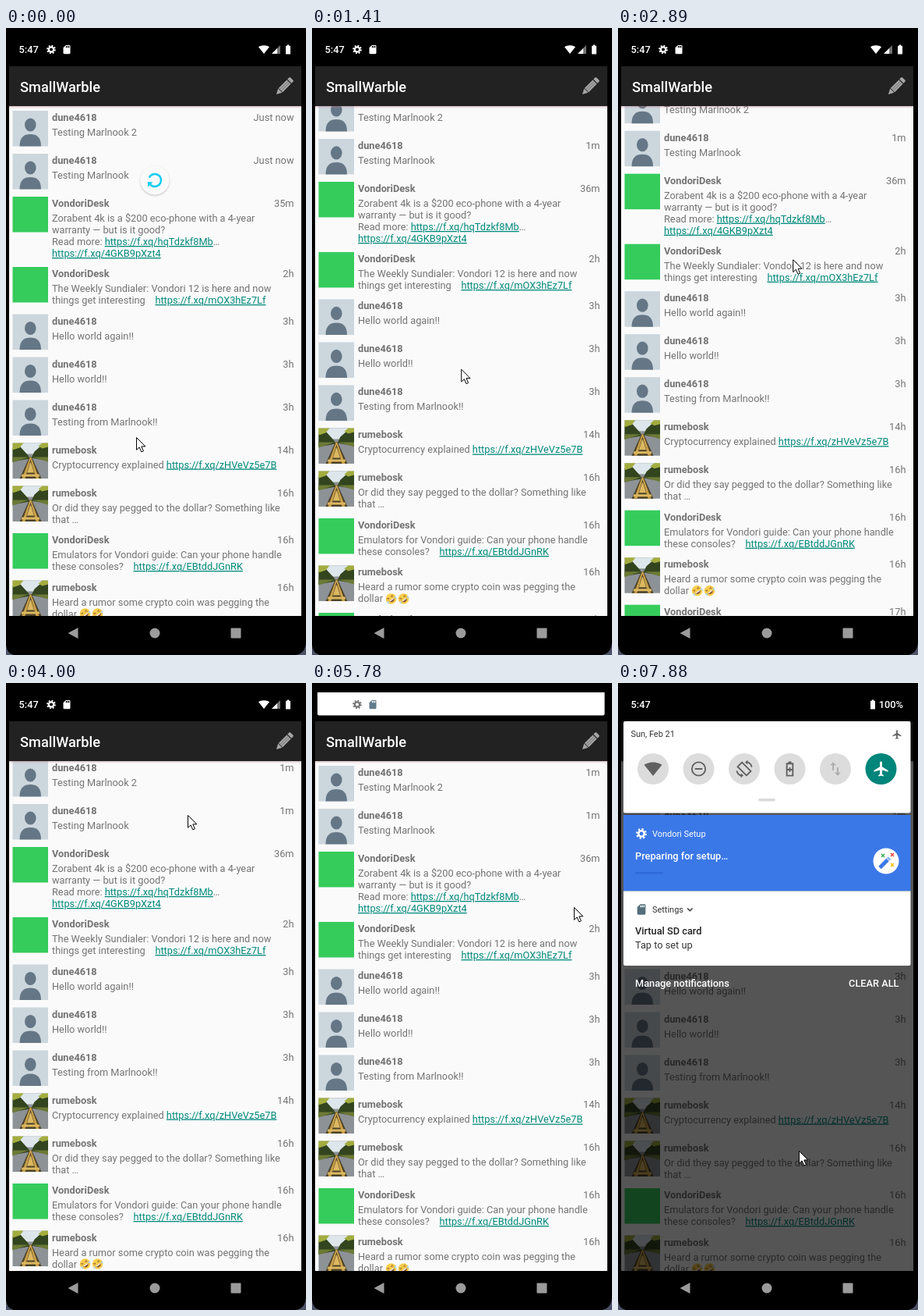
An HTML page for the animation above (8 s loop, 385 by 803 pixels).

```html
<!DOCTYPE html>
<html lang="en">
<head>
<meta charset="utf-8">
<title>Feed refresh</title>
<style>
html, body { margin: 0; width: 100%; height: 100%; overflow: hidden; background: #000; }
svg { display: block; }
#stage { width: 385px; height: 803px; }
text { font: 12.77px Roboto, sans-serif; white-space: pre; }
.b { font-weight: 700; }
.b, .body, .time { fill: #737373; }
.link { fill: #00897b; text-decoration: underline; text-decoration-skip-ink: none; }
.m { font-weight: 500; }
.s { font-size: 10.95px; }
.end { text-anchor: end; }
.title { font-size: 18.25px; font-weight: 500; }
</style>
</head>
<body>
<svg id="stage" viewBox="0 0 385 803">
  <defs>
    <clipPath id="feedClip"><rect x="4" y="100" width="375" height="653"/></clipPath>
    <clipPath id="screenClip"><rect x="4" y="12" width="375" height="741"/></clipPath>
    <clipPath id="barClip"><rect x="22" y="242" width="291" height="3"/></clipPath>
    <linearGradient id="shade" x2="0" y2="1">
      <stop stop-color="#b07888" stop-opacity=".45"/><stop offset="1" stop-color="#b07888" stop-opacity="0"/>
    </linearGradient>
    <filter id="soft" x="-30%" y="-30%" width="160%" height="170%">
      <feDropShadow dx="0" dy="1" stdDeviation="1.2" flood-opacity=".3"/>
    </filter>

    <symbol id="gear" viewBox="0 0 24 24">
      <g fill="none" stroke="currentColor">
        <circle cx="12" cy="12" r="5.6" stroke-width="4"/>
        <circle cx="12" cy="12" r="8.7" stroke-width="3.4" pathLength="16" stroke-dasharray="1"/>
      </g>
    </symbol>
    <symbol id="card" viewBox="0 0 24 24">
      <path fill="currentColor" fill-rule="evenodd" d="M18 2h-8L4 8v12a2 2 0 0 0 2 2h12a2 2 0 0 0 2-2V4a2 2 0 0 0-2-2zM12 8h-2V4h2zm3 0h-2V4h2zm3 0h-2V4h2z"/>
    </symbol>
    <symbol id="wifi" viewBox="0 0 24 24"><path fill="currentColor" d="M12 21.5 24 6.6C23 5.8 18.5 3 12 3S1 5.8 0 6.6z"/></symbol>
    <symbol id="signal" viewBox="0 0 24 24">
      <path fill="currentColor" opacity=".45" d="M2 22H22V2z"/><path fill="currentColor" d="M2 22H15V9z"/>
    </symbol>
    <symbol id="battery" viewBox="0 0 24 24"><path fill="currentColor" d="M16 4h-2V2h-4v2H8a1 1 0 0 0-1 1v16a1 1 0 0 0 1 1h8a1 1 0 0 0 1-1V5a1 1 0 0 0-1-1z"/></symbol>
    <symbol id="plane" viewBox="-.5 0 24 24">
      <path fill="currentColor" d="M21 16v-2l-8-5V3.5a1.5 1.5 0 0 0-3 0V9l-8 5v2l8-2.5V19l-2 1.5V22l3.5-1 3.5 1v-1.5L13 19v-5.5z"/>
    </symbol>
    <symbol id="mute" viewBox="0 0 24 24">
      <g fill="none" stroke="currentColor" stroke-width="2"><circle cx="12" cy="12" r="9"/><path d="M7 12h10"/></g>
    </symbol>
    <symbol id="rotate" viewBox="0 0 24 24">
      <g fill="none" stroke="currentColor" stroke-width="2">
        <path d="M9 3.2 20.8 15 15 20.8 3.2 9z"/><path d="M15 2.5q6 1.5 7 7M9 21.5q-6-1.5-7-7"/>
      </g>
      <path fill="currentColor" d="M13 3.5 16.5 0v6zM11 20.5 7.5 24v-6z"/>
    </symbol>
    <symbol id="saver" viewBox="0 0 24 24">
      <path fill="none" stroke="currentColor" stroke-width="2" d="M8 5h8v16H8zM9 13h6M12 10v6"/><path fill="currentColor" d="M10 2h4v3h-4z"/>
    </symbol>
    <symbol id="swap" viewBox="0 0 24 24">
      <path fill="currentColor" d="M16 17v-7h-2v7h-3l4 4 4-4zM9 3 5 7h3v7h2V7h3z"/>
    </symbol>

    <g id="person">
      <rect width="45.5" height="45.5" fill="#ccd6dd"/>
      <g fill="#657786"><ellipse cx="22.8" cy="18" rx="7.3" ry="8.6"/><path d="M9 45.5C9 34 14.5 30 22.8 30S36.5 34 36.5 45.5z"/></g>
    </g>
    <rect id="badge" width="45.5" height="45.5" fill="#35cc5c"/>
    <g id="road">
      <rect width="45.5" height="45.5" fill="#8d9296"/>
      <path fill="#dde6ea" d="M0 0h45.5v14H0z"/>
      <path fill="#33451f" d="M0 7 10 5 20 16 22 20 0 24zM45.5 2 36 4 28 11 24 19 45.5 23z"/>
      <path fill="#a3ad3f" d="M0 0h14L9 6 0 9zM45.5 0H38l-5 4 5 3 7.5-2z"/>
      <path fill="#6c7a35" d="M0 18 21 18 0 25zM45.5 18 25 18 45.5 24z"/>
      <path fill="#4c4228" d="M21.5 18h3L37 45.5H9z"/>
      <path fill="#c9a04a" d="M22.3 18h1.4L34 45.5h-4L23 21 16 45.5h-4z"/>
      <path fill="#dcb860" d="M22.5 25h1l4 13h-9zM12 40h22l1 3H11z"/>
    </g>
    <g id="laugh">
      <circle r="6.8" fill="#fcce4c"/>
      <g transform="rotate(-35)">
        <path fill="#8a5a34" d="M-3.5 1h7a3.5 3.5 0 0 1-7 0z"/>
        <path fill="#fff" d="M-3 1h6v1.2h-6z"/>
        <path fill="none" stroke="#9a6a34" stroke-width=".8" d="M-4.5-3.5l3 1.5-3 1M4.500-3.500l-3 1.500 3 1"/>
        <path fill="#9fd3f5" d="M-6.8 0l2.4.5-1.5 4zM6.8 0l-2.4.5 1.5 4z"/>
      </g>
    </g>
  </defs>

  <path d="M0 790Q1 801 10 803H0zM385 787Q384 801 372 803h13z" fill="#4c5266"/>

  <g clip-path="url(#feedClip)">
    <rect x="4" y="100" width="375" height="653" fill="#fafafa"/>
    <g id="feed"></g>
    <rect x="4" y="100" width="375" height="3" fill="url(#shade)"/>
    <g id="spinner">
      <circle r="18.5" fill="#fafafa" filter="url(#soft)"/>
      <g id="arc">
        <circle id="ring" r="8" fill="none" stroke="#12cdf0" stroke-width="2.5" pathLength="360"/>
        <path id="tip" fill="#12cdf0" d="M3.5 0h9L8 5z"/>
      </g>
    </g>
  </g>

  <rect x="4" y="49" width="375" height="51" fill="#222"/>
  <text class="title" x="18" y="82" fill="#fff">SmallWarble</text>
  <g transform="translate(357 75) rotate(45) scale(.92)" fill="#a6a6a6">
    <path d="M-4-13.500a1.500 1.500 0 0 1 1.500-1.500h5a1.500 1.500 0 0 1 1.500 1.500v3h-8zM-4-9.200h8V7h-8zM-4 8h8L0 15.500z"/>
    <path d="M-1.300-9V7M1.300-9V7" stroke="#6c6c6c"/>
  </g>

  <g clip-path="url(#screenClip)">
    <rect id="dim" x="4" y="49" width="375" height="704"/>
    <g id="notes">
      <path fill="#3b78e7" d="M7 169h368.5v97.5H7z"/>
      <path fill="#fff" d="M7 266.5h368.5V360q0 2-2 2H9q-2 0-2-2z"/>
      <text class="s" x="44" y="197" fill="#fff">Vondori Setup</text>
      <text class="m" x="22" y="225.5" fill="#fff">Preparing for setup…</text>
      <g clip-path="url(#barClip)"><rect id="bar" y="242" width="131" height="2.5" fill="#2f69d8"/></g>
      <circle cx="344" cy="228" r="16.5" fill="#fff"/>
      <path d="M336 236.5 346 226.5" stroke="#3b78e7" stroke-width="5"/>
      <path d="M346.5 226 348.5 224" stroke="#8ab4f8" stroke-width="5"/>
      <g fill="none" stroke-width="1.5">
        <path stroke="#34a853" d="M338 219l4 4m0-4-4 4"/><path stroke="#ea4335" d="M350 218l4 4m0-4-4 4"/><path stroke="#fbbc04" d="M350 231l4 4m0-4-4 4"/>
      </g>
      <text class="s" x="44" y="294" fill="#333">Settings</text>
      <path d="M89 288.5l3.3 3.3 3.3-3.3" fill="none" stroke="#333" stroke-width="1.4"/>
      <text class="m" x="22" y="322" fill="#212121">Virtual SD card</text>
      <text x="22" y="340" fill="#333">Tap to set up</text>
      <text class="m" x="22" y="389" fill="#fff">Manage notifications</text>
      <text class="m end" x="360.5" y="389" fill="#fff">CLEAR ALL</text>
    </g>
    <g id="panel">
      <rect x="7" y="49" width="368.5" height="117.5" rx="2" fill="#fff"/>
      <g id="quick">
        <text class="s" x="16.5" y="69" fill="#333">Sun, Feb 21</text>
        <rect x="180" y="148" width="22" height="3.6" rx="1.8" fill="#dadada"/>
      </g>
    </g>
  </g>

  <text class="m" x="16.5" y="32" fill="#fff">5:47</text>
  <g id="alerts"></g>
  <g id="radio"></g>
  <g id="charge"><text class="m end" x="366" y="32" fill="#fff">100%</text></g>

  <g fill="#9b9b9b"><path d="M79.5 775 92.5 768v14z"/><circle cx="191" cy="775" r="6.5"/><rect x="288.5" y="768.5" width="13" height="13" rx="1"/></g>
  <path id="cursor" d="M.5.5v15.800l3.600-3.400 2.700 6 2.600-1.100-2.600-5.900h5z" fill="#fff" stroke="#000"/>
</svg>

<script>
const LOOP = 8000, RELOAD = 1140, SHADE = 5480, TOGGLE = 7070;
const TEAL = '#00857a', PALE = '#dcdcdc', INK = '#616161';
const $ = id => document.getElementById(id);
const add = (id, markup) => $(id).insertAdjacentHTML('beforeend', markup);
const icon = (name, x, y, size, color, id = '') =>
  `<use href="#${name}" ${id && `id="${id}"`} x="${x - size / 2}" y="${y - size / 2}" width="${size}" height="${size}" color="${color}"/>`;

// Feed: [avatar, age, lines]; square brackets mark links.
const names = { person: 'dune4618', badge: 'VondoriDesk', road: 'rumebosk' };
const gap = '\u00a0'.repeat(4);
const posts = [
  ['person', 'Just now', ['Testing Marlnook 2']],
  ['person', 'Just now', ['Testing Marlnook']],
  ['badge', '35m', ['Zorabent 4k is a $200 eco-phone with a 4-year', 'warranty — but is it good?',
    'Read more: [https://f.xq/hqTdzkf8Mb]…', '[https://f.xq/4GKB9pXzt4]']],
  ['badge', '2h', ['The Weekly Sundialer: Vondori 12 is here and now', `things get interesting${gap}[https://f.xq/mOX3hEz7Lf]`]],
  ['person', '3h', ['Hello world again!!']],
  ['person', '3h', ['Hello world!!']],
  ['person', '3h', ['Testing from Marlnook!!']],
  ['road', '14h', ['Cryptocurrency explained [https://f.xq/zHVeVz5e7B]']],
  ['road', '16h', ['Or did they say pegged to the dollar? Something like', 'that …']],
  ['badge', '16h', ['Emulators for Vondori guide: Can your phone handle', `these consoles?${gap}[https://f.xq/EBtddJGnRK]`]],
  ['road', '16h', ['Heard a rumor some crypto coin was pegging the', 'dollar ☺']],
  ['badge', '17h', ['Save 33% on this mini projector today!', '[https://f.xq/pzG7fXvhkb]']],
  ['badge', '17h', ['Camera shootout: Norvane Meadow K47 Extra vs Orlin']]
];
const rowHeight = n => n < 2 ? 55 : 30.5 + 15 * n - (n > 2 ? 0.5 : 0);

let rowTop = 106;
for (const [who, age, lines] of posts) {
  let row = `<use href="#${who}" x="8.5" y="${rowTop}"/><text class="b" x="59" y="${rowTop + 13}">${names[who]}</text>` +
    `<text class="time end" x="369.5" y="${rowTop + 13}">${age}</text>`;
  lines.forEach((line, i) => {
    const y = rowTop + 32 + 15 * i;
    if (line.endsWith('☺')) {
      row += [101.5, 117.5].map(x => `<use href="#laugh" x="${x}" y="${y - 4.5}"/>`).join('');
      line = line.slice(0, -2);
    }
    row += `<text class="body" x="59" y="${y}">${line.replace(/\[(.*?)\]/g, '<tspan class="link">$1</tspan>')}</text>`;
  });
  add('feed', row);
  rowTop += rowHeight(lines.length);
}
const ages = [...document.querySelectorAll('.time')].slice(0, 3);
const agesBefore = ages.map(a => a.textContent), agesAfter = ['1m', '1m', '36m'];

['wifi', 'mute', 'rotate', 'saver', 'swap', 'plane'].forEach((name, i) => {
  const x = 45 + 58.5 * i;
  add('quick', `<circle id="${name}Tile" cx="${x}" cy="110" r="20" fill="${PALE}"/>` + icon(name, x, 110, 23, INK, name + 'Icon'));
});
add('quick', `<g id="online">${icon('wifi', 345, 66, 14, INK)}${icon('signal', 360, 66, 13, INK)}</g>` + icon('plane', 358, 66, 14, INK, 'offline'));
add('notes', icon('gear', 30, 193, 16, '#fff') + icon('card', 30, 290, 16, '#546e7a'));
add('alerts', icon('gear', 58, 27.5, 13.5, 'inherit', 'gearAlert') + icon('card', 78, 27.5, 13.5, 'inherit', 'cardAlert'));
add('radio', icon('wifi', 331, 27.5, 14, '#fff') + icon('signal', 346.5, 27.5, 13, '#fff') + icon('battery', 362, 27.5, 14.5, '#fff'));
add('charge', icon('battery', 327, 27.5, 14.5, '#fff'));

// Smooth interpolation between [time, ...values] stops.
function track(stops, t) {
  const i = stops.findIndex(s => s[0] > t);
  if (i < 0) return stops.at(-1).slice(1);
  if (!i) return stops[0].slice(1);
  const a = stops[i - 1], b = stops[i];
  let p = (t - a[0]) / (b[0] - a[0]);
  p = p * p * (3 - 2 * p);
  return a.slice(1).map((v, k) => v + (b[k + 1] - v) * p);
}
const scroll = [[120, 0], [660, 108], [900, 112], [RELOAD, 110], [RELOAD, 0], [1700, 40], [2220, 12.5],
  [2340, 12.5], [2610, 30], [2780, 30], [3880, 6], [4400, 6], [4800, 0]];
const pointer = [[0, 167, 524], [120, 167, 524], [660, 149, 562], [1300, 190, 440], [2220, 221, 358], [2340, 221, 358],
  [2610, 224, 300], [2780, 224, 300], [3880, 233, 170], [4000, 233, 169], [4400, 233, 169], [4800, 262, 260],
  [5360, 331, 38], [5480, 332, 38], [5780, 336, 287], [5930, 336, 287], [6440, 339, 91], [6560, 339, 93],
  [6800, 339, 106], [7200, 339, 106], [7880, 232, 599]];
const drop = [[SHADE, -160], [5600, -125], [5930, -125], [6400, 0]];

const move = (id, x, y, rest = '') => $(id).setAttribute('transform', `translate(${x} ${y}) ${rest}`);
const fade = (id, alpha) => $(id).setAttribute('opacity', Math.min(1, Math.max(0, +alpha)));
const tint = (id, color) => $(id).setAttribute('color', color);
function tile(name, on, off = INK) {
  $(name + 'Tile').setAttribute('fill', on ? TEAL : PALE);
  tint(name + 'Icon', on ? '#fff' : off);
}

function draw(t) {
  move('feed', 0, -track(scroll, t)[0]);
  ages.forEach((a, i) => {
    const s = (t < RELOAD ? agesBefore : agesAfter)[i];
    if (a.textContent !== s) a.textContent = s;
  });

  const pulled = t < 120;
  const [y, size] = track([[120, 195, 1], [420, 141, 1], [990, 141, 1], [RELOAD, 141, 0]], t);
  move('spinner', 191, y, `scale(${size})`);
  const sweep = pulled ? 290 : 200, start = pulled ? 205 : -90 + (t - 660) * 0.3;
  $('arc').setAttribute('transform', `rotate(${start})`);
  $('ring').setAttribute('stroke-dasharray', `${sweep} 360`);
  $('tip').setAttribute('transform', `rotate(${sweep})`);
  fade('tip', pulled);

  const [drag] = track(drop, t), open = Math.max(0, 1 + drag / 125);
  move('panel', 0, drag);
  move('notes', 0, drag * 2.2);
  fade('quick', open);
  fade('notes', open * 1.5);
  fade('dim', open * 0.66);
  const opening = t >= SHADE;
  tint('gearAlert', opening ? '#757575' : '#fff');
  tint('cardAlert', opening ? '#607d8b' : '#fff');
  fade('alerts', 1 - open * 3);
  fade('radio', open < 0.3);
  fade('charge', open >= 0.3);

  const flight = t >= TOGGLE, cut = t >= TOGGLE + 130;
  tile('plane', flight);
  tile('wifi', !cut);
  tile('swap', !cut, '#ababab');
  fade('online', !cut);
  fade('offline', cut);
  const left = 182 + 167 * Math.min(1, Math.max(0, (t - TOGGLE) / 810));
  $('bar').setAttribute('x', left > 313 ? left - 422 : left);

  move('cursor', ...track(pointer, t));
}

const begin = performance.now();
function tick() {
  draw((performance.now() - begin) % LOOP);
  requestAnimationFrame(tick);
}
draw(0);
tick();
</script>
</body>
</html>
```
